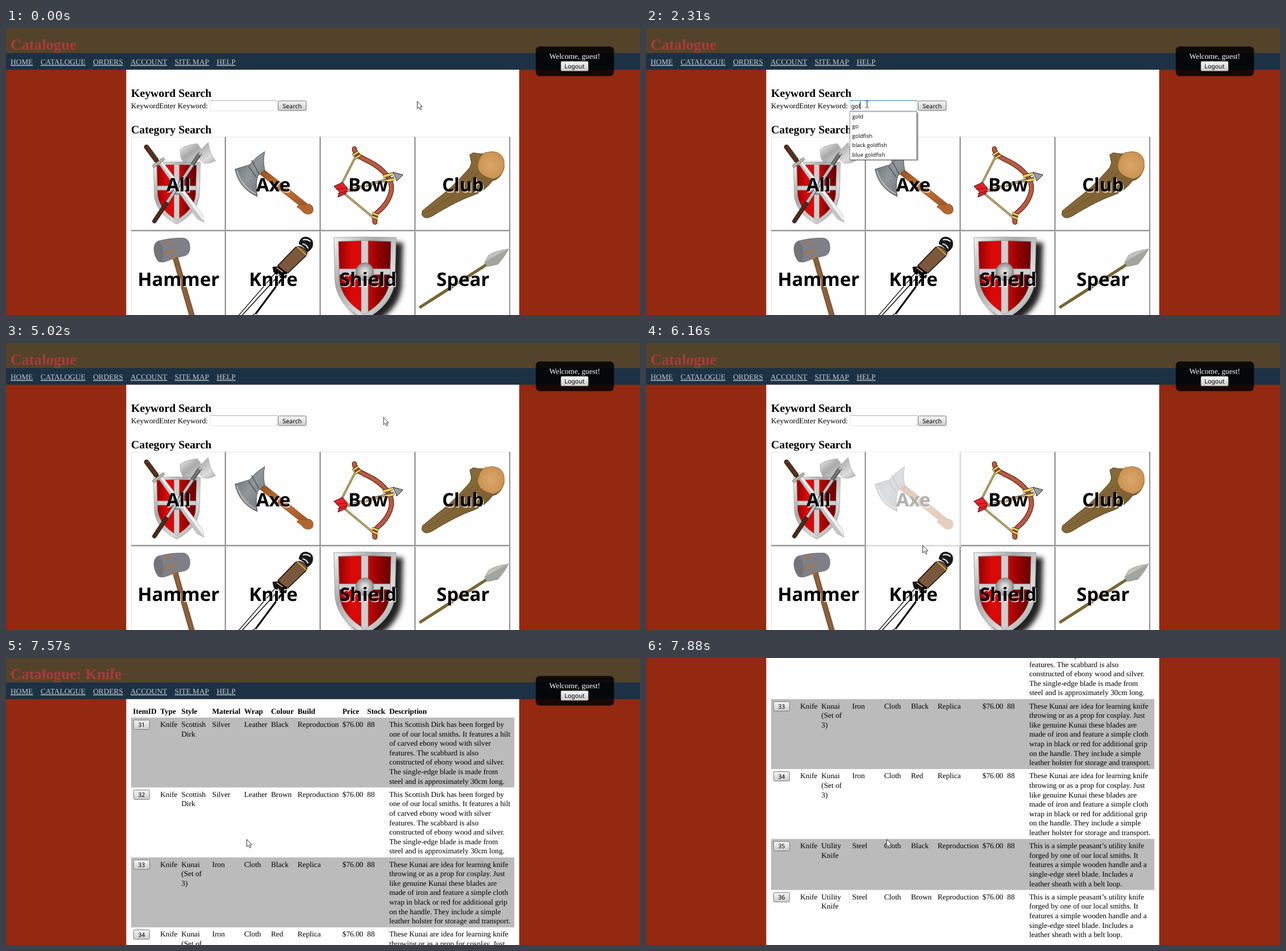
These frames come from a looping animation (1110x504 px, 8000 ms). An HTML page:

```html
<!DOCTYPE html>
<html lang="en">
<head>
<meta charset="utf-8">
<title>Catalogue</title>
<style>
html, body { margin: 0; width: 100%; height: 100%; overflow: hidden; background: #932911; }
svg { display: block; width: 1110px; height: 504px; }
text { font: 13.28px "Liberation Serif", serif; text-rendering: geometricPrecision; white-space: pre; }
.b { font-weight: bold; }
.title { font-size: 26.6px; font-weight: bold; fill: #a93a3c; }
.head { font-size: 19.8px; font-weight: bold; }
.nav { fill: #c3cbd0; text-decoration: underline; }
.ui { font: 10.6px "Noto Sans", "Open Sans", sans-serif; }
.item { font: 9.6px "Open Sans", "Noto Sans", sans-serif; }
.label { font: bold 32.7px "Noto Sans", "Open Sans", sans-serif; text-anchor: middle; }
.mid { text-anchor: middle; }
</style>
</head>
<body>
<svg id="stage" viewBox="0 0 1110 504"></svg>
<script>
const LOOP = 8000;
const stage = document.getElementById('stage');

// Markup helpers
const text = (x, y, s, cls = '', extra = '') => `<text x="${x}" y="${y}" class="${cls}" ${extra}>${s}</text>`;
const rect = (x, y, w, h, fill, extra = '') => `<rect x="${x}" y="${y}" width="${w}" height="${h}" fill="${fill}" ${extra}/>`;
const path = (d, fill, stroke = 'none', w = 1, extra = '') =>
  `<path d="${d}" fill="${fill}" stroke="${stroke}" stroke-width="${w}" ${extra}/>`;
const line = (d, stroke, w, extra = '') => path(d, 'none', stroke, w, extra);
const rod = (d, edge, fill, w, cap = 'butt') =>
  line(d, edge, w + 1.6, `stroke-linecap="${cap}"`) + line(d, fill, w, `stroke-linecap="${cap}"`);
const group = (id, body, extra = '') => `<g id="${id}" ${extra}>${body}</g>`;
const gradient = (id, dir, ...stops) => `<linearGradient id="${id}" ${dir}>` +
  stops.map((c, i) => `<stop offset="${i / (stops.length - 1)}" stop-color="${c}"/>`).join('') + '</linearGradient>';
const button = (x, y, w, h, s) =>
  rect(x + .5, y + .5, w - 1, h - 1, 'url(#btn)', 'rx="2" stroke="#777"') +
  text(x + w / 2, y + h / 2 + 4, s, 'ui mid');

const defs = '<defs>' +
  gradient('btn', 'x2="0" y2="1"', '#f4f4f4', '#e9e9e9', '#d9d9d9', '#cecece') +
  gradient('red', '', '#960000', '#dc0808', '#d80808', '#960000', '#680000') +
  gradient('silver', 'y2="1"', '#f2f2f2', '#a9a9a9', '#dcdcdc', '#8f8f8f') +
  gradient('steel', 'y2="1"', '#62676b', '#92979b', '#6a6f73') +
  gradient('haft', 'y2="1"', '#8f4c22', '#c47333', '#9d5424') +
  gradient('bark', 'y2="1"', '#91723f', '#836636', '#6c522b') +
  '<radialGradient id="boss"><stop offset="0" stop-color="#f4f4f4"/><stop offset="1" stop-color="#8d8d8d"/></radialGradient>' +
  '<radialGradient id="cut"><stop offset="0" stop-color="#d9a768"/><stop offset="1" stop-color="#cb9354"/></radialGradient>' +
  '<filter id="soft" x="-20%" y="-20%" width="140%" height="140%"><feGaussianBlur stdDeviation="4"/></filter>' +
  '<clipPath id="knifeClip"><rect x="385" y="356" width="166" height="166"/></clipPath></defs>';

// Shield in its own 109 x 145 box
const rim = 'M0 1Q54 -1 109 1L107 78Q102 120 54 145Q6 120 2 78Z';
const shield =
  path(rim, 'url(#silver)', '#8f8f8f', .8) +
  path('M8 8Q54 5 100 8L98 77Q94 112 54 135Q14 112 10 77Z', 'url(#red)', '#777', .8) +
  path('M48 6H60V56H99V66H60V133L54 136L48 133V66H9V56H48Z', '#cfcfcf', '#8c8c8c', .7) +
  '<circle cx="54" cy="61" r="15.5" fill="url(#boss)" stroke="#777"/>';

const art = {
  All:
    path('M305 213Q315 205 335 203L342 213L354 201Q357 222 367 233Q356 239 346 237L336 228L328 250Q303 238 305 213Z', 'url(#silver)', '#aaa', .8) +
    `<g transform="translate(258 235) scale(.755)">${shield}</g>` +
    path('M262 231L268 227L344 327L347 341L335 335Z', '#c6c6c6', '#888', .7) +
    path('M265 229L268 227L344 327L347 341Z', '#f1f1f1') +
    rod('M246 209L263 232', '#2a140a', '#57301d', 7, 'round') +
    rod('M257 244L277 229', '#555', '#b9b9b9', 3.5) +
    rod('M341 219L270 324', '#444', '#bfc0c2', 4.5) +
    rod('M280 309L260 339', '#24100a', '#4c2a1c', 6, 'round') +
    rod('M338 222L326 240', '#333', '#777', 4.5),
  Axe:
    rod('M441 247L528 316', '#8a4a22', 'url(#haft)', 10, 'round') +
    path('M514 309Q523 312 531 309Q540 313 537 323Q532 330 522 325Q516 318 509 314Z', '#b1662f', '#8a4a22', .8) +
    path('M401 248Q417 243 427 240Q434 229 453 217Q449 233 453 249L441 260Q436 274 440 296Q408 282 401 248Z', 'url(#steel)', '#555', 1) +
    line('M404 250Q413 279 437 291', '#b4b8bb', 2) +
    line('M430 232L443 256M425 243L438 262', '#50555a', 1.5),
  Bow:
    line('M613 224L583 283L642 332', '#222', 3.2) + line('M613 224L583 283L642 332', '#efc54c', 1.7) +
    rod('M610 212C611 226 629 230 644 239C663 251 675 266 675 281C674 300 661 315 651 323Q644 329 646 341', '#1c0c06', '#bd583c', 7, 'round') +
    rod('M585 289L680 263', '#222', '#dba76c', 3) +
    path('M677 253L695 258L684 269L682 262Z', '#9b9da0', '#222') +
    path('M574 278L589 271L598 281L595 291L581 297L584 288Z', '#e8202a', '#222') +
    line('M578 283L595 281M580 291L596 287', '#711', 1) +
    rod('M607 224L617 217M611 229L621 223M641 325L652 329M640 331L651 335', '#222', '#f0cd58', 3) +
    rod('M660 261L677 256M663 269L679 266', '#222', '#f0cd58', 4),
  Club:
    path('M729 321L752 302Q781 281 812 245L815 237L812 223L818 219Q839 224 852 217Q873 222 872 246Q866 266 852 268Q840 285 820 293Q790 303 745 331Q733 337 728 328Z', 'url(#bark)', '#57421f', 1) +
    line('M737 323Q792 292 829 251M779 286L818 252', '#745830', 1.2) +
    path('M838 219Q867 212 872 233Q874 260 853 265Q826 259 826 241Q829 225 838 219Z', 'url(#cut)', '#a06a38', .8),
  Hammer:
    rod('M296 402L327 510', '#5c3920', '#8b5f3c', 8) +
    path('M267 374Q290 368 312 369Q322 372 322 386Q322 397 313 400Q296 403 285 408Q274 413 267 410Q259 400 259 387Q260 376 267 374Z', '#7f8087', '#5d5e64', .8) +
    path('M267 374Q274 380 276 395Q276 408 271 411Q262 409 259 391Q259 378 267 374Z', '#73747a') +
    [[283, 377], [282, 394], [293, 404], [291, 391]].map(p => `<ellipse cx="${p[0]}" cy="${p[1]}" rx="3.2" ry="2.8" fill="#ad743d"/>`).join(''),
  Knife:
    path('M471 431L486 438L437 501L404 522L408 504Z', '#fff', '#000', 1.2) +
    line('M476 436L412 506', '#000', 1.4) +
    line('M486 436L437 502', '#000', 3) +
    path('M476 417L506 386Q515 379 527 392Q528 399 521 404L493 431Q484 427 476 417Z', '#7b573b', '#000', 1.3) +
    path('M467 420L477 419L493 431L489 440L478 432L469 429Z', '#111', '#000') +
    line('M474 421L489 432M509 383L526 399', '#d3a843', 1.8) +
    path('M513 379Q515 367 525 367Q537 369 537 378Q538 387 528 393Q522 383 513 379Z', '#1a1a1a', '#000') +
    line('M520 372Q527 370 533 375M519 379Q526 380 529 387', '#eee', 2.2),
  Shield:
    `<g transform="translate(586 376)" filter="url(#soft)">${path(rim, '#222')}</g>` +
    `<g transform="translate(574 367)">${shield}</g>`,
  Spear:
    rod('M724 491L842 415', '#4f3d17', '#806a2e', 3.4) +
    path('M880 388Q857 391 845 399L838 411L842 419L861 415Q872 403 880 388Z', '#a4a5a1', '#858681', .8) +
    path('M880 388Q857 399 838 411L845 399Q858 391 880 388Z', '#c0c1bd')
};

const names = Object.keys(art);
const tile = (name, i) => {
  const x = 219 + 166 * (i % 4), y = 191 + 166 * (i >> 2);
  const cx = x + 83, base = y + 96;
  return group(name,
    rect(x, y, 165, 165, '#fefefe') + art[name] +
    line(`M${x + .5} ${y + 165}V${y + .5}H${x + 165}`, '#e6e6e6', 1, 'class="hi"') +
    line(`M${x + 164.9} ${y}V${y + 164.6}H${x}`, '#777', 1.6, 'class="lo"') +
    text(cx + 1.5, base + 1.5, name, 'label', 'fill="#fff" opacity=".75"') + text(cx, base, name, 'label'),
    name === 'Knife' ? 'clip-path="url(#knifeClip)"' : '');
};

const catalogue =
  rect(210.5, 73.3, 688, 431, '#fefefe') +
  text(219, 121, 'Keyword Search', 'head') + text(219, 141, 'KeywordEnter Keyword:') +
  text(219, 185, 'Category Search', 'head') +
  rect(357.5, 127.5, 117, 18, '#fff', 'id="field" stroke="#e2e3ea"') +
  rect(357, 127, 118, 1, '#abadb3', 'id="fieldTop"') +
  text(359, 141, '', 'ui', 'id="typed"') + rect(359, 129, 1, 14, '#000', 'id="caret"') +
  button(476, 127.5, 50, 18, 'Search') +
  names.map(tile).join('') + group('list', '');

// Result tables
const LINE = 16.6;
const heads = ['ItemID', 'Type', 'Style', 'Material', 'Wrap', 'Colour', 'Build', 'Price', 'Stock', 'Description'];
const cell = (x, y, s) => s.split('/').map((l, i) => text(x, y + i * LINE, l)).join('');
function table(cols, left, width, btnWidth, rows) {
  let y = 105.6;
  let out = heads.map((h, i) => text(cols[i], 99, h, 'b')).join('');
  rows.forEach((row, i) => {
    const h = row[9].split('/').length * LINE + 6.6;
    if (i % 2 === 0) out += rect(left, y, width, h, '#bbb');
    out += button(cols[0] + .5, y + 3.9, btnWidth, 17.5, row[0]);
    for (let c = 1; c < 10; c++) out += cell(cols[c], y + 16.3, row[c]);
    y += h;
  });
  return out;
}

const goldText = 'Behold! The legendary blade Excalibur! Whoso/pulleth out this sword of this stone and anvil, is/rightwise king (or queen) born. In accordance/with legend you cannot simply purchase this/weapon; you may however purchase an/opportunity to pull the sword from the stone/and become the rightful ruler of an empire./Those who are victorious in this regard can look/forward to a blade polished so brightly it will/blind your enemies, an ornate scabbard that will/prevent you from bleeding, and a lovely piece/of circular furniture. Note: because of the nature/of acquisition, this item cannot be delivered;/pickup only.';
const dirkText = 'This Scottish Dirk has been forged by/one of our local smiths. It features a hilt/of carved ebony wood with silver/features. The scabbard is also/constructed of ebony wood and silver./The single-edge blade is made from/steel and is approximately 30cm long.';
const kunaiText = 'These Kunai are idea for learning knife/throwing or as a prop for cosplay. Just/like genuine Kunai these blades are/made of iron and feature a simple cloth/wrap in black or red for additional grip/on the handle. They include a simple/leather holster for storage and transport.';
const utilityText = 'This is a simple peasant’s utility knife/forged by one of our local smiths. It/features a simple wooden handle and a/single-edge steel blade. Includes a/leather sheath with a belt loop.';

const kinds = [
  ['Scottish/Dirk', 'Silver', 'Leather', 'Black Brown', 'Reproduction', dirkText],
  ['Kunai/(Set of/3)', 'Iron', 'Cloth', 'Black Red', 'Replica', kunaiText],
  ['Utility/Knife', 'Steel', 'Cloth', 'Black Brown', 'Reproduction', utilityText]
];
let id = 31;
const knifeRows = kinds.flatMap(([style, metal, wrap, colours, build, note]) =>
  colours.split(' ').map(c => [String(id++), 'Knife', style, metal, wrap, c, build, '$76.00', '88', note]));

const gold = rect(213, 73.3, 697, 278.7, '#fefefe') +
  table([225, 273, 314, 372.7, 428.7, 468, 514.7, 566, 602.7, 641], 221.3, 680.5, 23,
    [['7', 'Sword', 'Excalibur', 'Gold', 'Gold', 'Gold', 'Genuine', '$0.00', '1', goldText]]);
const knives = rect(210.5, 73.3, 688, 760, '#fefefe') +
  table([222.3, 270, 307, 361, 417, 464, 510.5, 589, 632.3, 671], 219, 671, 29, knifeRows);

const links = [['HOME', 8], ['CATALOGUE', 60.5], ['ORDERS', 152.5], ['ACCOUNT', 218], ['SITE MAP', 295.3], ['HELP', 368.7]];
const header = rect(0, 0, 1110, 44, '#53432a') + rect(0, 44, 1110, 29.3, '#1c3144') +
  text(8, 37.6, '', 'title', 'id="title"') +
  links.map(([s, x]) => text(x, 64, s, 'nav')).join('');
const welcome = rect(927.5, 32.5, 137, 52, '#000', 'rx="7" fill-opacity=".84"') +
  text(995.7, 54, 'Welcome, guest!', 'mid', 'fill="#fff"') + button(971, 58, 49, 18, 'Logout');

stage.innerHTML = defs + rect(0, 0, 1110, 504, '#932911') +
  group('page', header + group('catalogue', catalogue) + group('gold', gold) + group('knives', knives) + group('welcome', welcome)) +
  group('arrow', path('M.5 .5V13.6L3.4 10.9L5.6 15.6L7.8 14.6L5.7 10.1H9.6Z', '#fff', '#333', 1)) +
  group('beam', line('M-3 -6H-.7M.7 -6H3M0 -5.5V5.5M-3 6H-.7M.7 6H3', '#222', 1.1));

const $ = key => document.getElementById(key);
const show = (key, on) => $(key).setAttribute('display', on ? 'inline' : 'none');
const set = (key, attr, value) => $(key).setAttribute(attr, value);

// Pointer legs: start, end, number of steps, destination
const legs = [
  [350, 510, 3, 562, 128], [660, 865, 4, 478, 123], [930, 1130, 4, 387, 134],
  [3060, 3060, 1, 385.5, 133], [5020, 5020, 1, 660.5, 130],
  [5700, 6160, 7, 484, 355], [6250, 6480, 4, 446, 424], [7110, 7490, 6, 421, 318]
];
function pointer(t) {
  let x = 719.5, y = 128;
  for (const [from, to, n, tx, ty] of legs) {
    if (t < from) break;
    const done = n === 1 ? 1 : Math.min(n, 1 + Math.floor((t - from) / (to - from) * (n - 1) + 1e-6)) / n;
    x += (tx - x) * done;
    y += (ty - y) * done;
  }
  return [x, y];
}

// Latest value in a list of [time, value]
const at = (t, list) => list.reduce((v, [from, value]) => t >= from ? value : v, list[0][1]);
const typing = [[0, ''], [2070, 'g'], [2230, 'go'], [2310, 'gol'], [2450, 'gold'], [2990, '']];
const words = ['gold', 'go', 'goldfish', 'black goldfish', 'blue goldfish', 'dagger'];
const filters = [[0, ''], [2150, 'g'], [2230, 'go'], [2380, 'gol'], [2830, '']];
const scrolls = [[0, 0], [7570, 1], [7640, 72], [7720, 165], [7800, 240], [7880, 279]];
const pages = [[0, 'catalogue'], [2990, 'gold'], [5020, 'catalogue'], [6710, 'knives']];
const titles = { catalogue: 'Catalogue', gold: 'Catalogue: gold', knives: 'Catalogue: Knife' };

function dropdown(key) {
  if (!key) return '';
  const hits = words.filter(w => w.includes(key));
  const h = hits.length * 16.55 + 1.6;
  return rect(359, 149, 118, h, '#000', 'opacity=".22"') + rect(358, 148, 118, h, '#000', 'opacity=".25"') +
    rect(356.9, 146.8, 117, h, '#fff', 'stroke="#8a8a8a"') +
    hits.map((w, i) => text(361, 159.4 + i * 16.55, w, 'item')).join('');
}

function draw(t) {
  const current = at(t, pages);
  for (const key in titles) show(key, key === current);
  $('title').textContent = titles[current];
  set('page', 'transform', `translate(0 ${-at(t, scrolls)})`);
  set('welcome', 'transform', `translate(${current === 'gold' ? 14 : 0} 0)`);

  const [x, y] = pointer(t);
  const beam = t < 3060 && x < 475;
  show('arrow', !beam);
  show('beam', beam);
  set(beam ? 'beam' : 'arrow', 'transform', `translate(${x} ${y})`);

  const focused = t >= 1200 && t < 2990;
  set('field', 'stroke', focused ? '#b5cfe7' : '#e2e3ea');
  set('fieldTop', 'fill', !focused ? '#abadb3' : t < 1350 ? '#7494ad' : '#3d7bad');
  $('typed').textContent = at(t, typing);
  show('caret', focused && (t < 1750 || t >= 2070));
  set('caret', 'x', 359 + $('typed').getComputedTextLength());
  $('list').innerHTML = dropdown(at(t, filters));

  const hover = t >= 5020 && y > 190 && x > 219 && x < 883
    ? names[Math.floor((x - 219) / 166) + 4 * (y >= 356)] : '';
  for (const n of names) set(n, 'opacity', n === hover ? .3 : 1);
  const pressed = t >= 6560;
  $('Knife').querySelector('.hi').setAttribute('stroke', pressed ? '#777' : '#e6e6e6');
  $('Knife').querySelector('.lo').setAttribute('stroke', pressed ? '#e6e6e6' : '#777');
}

const start = performance.now();
function tick() {
  draw((performance.now() - start) % LOOP);
  requestAnimationFrame(tick);
}
draw(0);
requestAnimationFrame(tick);
</script>
</body>
</html>
```
